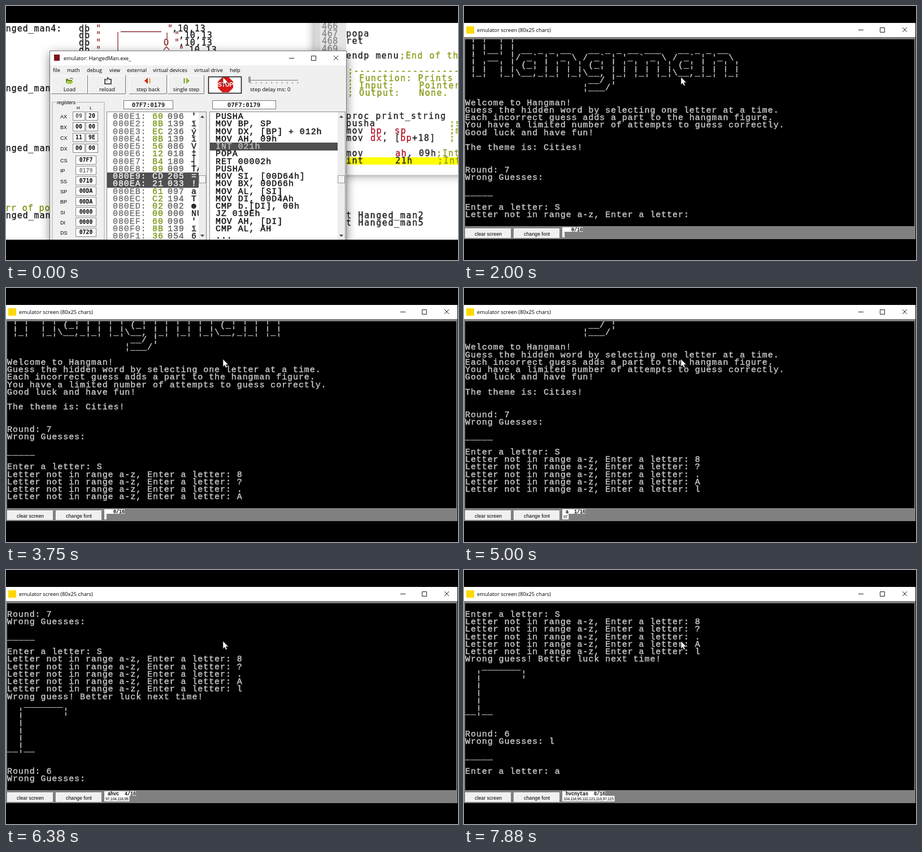
Write an HTML page that moves like this. It is 800 by 450 pixels and loops after 8 s.

```html
<!DOCTYPE html>
<html lang="en">
<head>
<meta charset="utf-8">
<title>Hangman in an emulator</title>
<style>
html, body { margin: 0; width: 100%; height: 100%; overflow: hidden; background: #000; }
svg { display: block; width: 800px; height: 450px; }
text { white-space: pre; }
.ui { font-family: "Open Sans", "Noto Sans", sans-serif; }
.btn { font-family: "Liberation Sans", Arial, sans-serif; }
.mono { font-family: "Liberation Mono", monospace; }
.code { font-family: "DejaVu Sans Mono", monospace; }
</style>
</head>
<body>
<svg id="stage" viewBox="0 0 800 450">
  <defs>
    <clipPath id="view"><rect y="30" width="800" height="384"/></clipPath>
    <clipPath id="tty"><rect x="2" y="59" width="795" height="331"/></clipPath>
    <clipPath id="mem"><rect x="179" y="188" width="162" height="226"/></clipPath>
    <filter id="shadow" x="-20%" y="-20%" width="140%" height="140%"><feGaussianBlur stdDeviation="9"/></filter>
  </defs>
  <rect width="800" height="450"/>
  <g id="desk" clip-path="url(#view)"></g>
  <g id="screen"></g>
  <path d="M384 126v13.5l3-2.8 2.1 4.6 2.3-1-2.1-4.5h4.2z" fill="#fff" stroke="#222" stroke-width=".7"/>
</svg>
<script>
const LOOP = 8000, CUT = 130, COL = 9.92, ROW = 13.25;
const desk = document.getElementById("desk");
const screen = document.getElementById("screen");

function add(parent, tag, attrs, str) {
  const el = document.createElementNS("http://www.w3.org/2000/svg", tag);
  for (const k in attrs) el.setAttribute(k, attrs[k]);
  if (str !== undefined) el.textContent = str;
  parent.appendChild(el);
  return el;
}
const box = (p, x, y, width, height, fill, more) => add(p, "rect", { x, y, width, height, fill, ...more });
const line = (p, d, stroke = "#222", more) => add(p, "path", { d, stroke, fill: "none", ...more });
const shape = (p, d, fill) => add(p, "path", { d, fill });
const text = (p, x, y, str, cls, size, fill = "#000", more) =>
  add(p, "text", { x, y, class: cls, "font-size": size, fill, ...more }, str);
// heavier strokes, as in the bitmap fonts
const grid = (p, x, y, str, fill) =>
  text(p, x, y, str, "mono", 15, fill, { "letter-spacing": COL - 9, stroke: fill, "stroke-width": .45 });
const code = (x, y, str, fill, spacing = .9) =>
  text(desk, x, y + 5, str, "code", 15, fill, { "letter-spacing": spacing, stroke: fill, "stroke-width": .35 });

function controls(p, x1, x2, x3, y) {
  line(p, `M${x1} ${y + .5}h9M${x2 + .5} ${y - 3.5}h8v8h-8zM${x3} ${y - 4}l8 8m0-8l-8 8`);
}
function button(p, x, y, w, h) {
  box(p, x, y, w, h, "#f0f0f0");
  line(p, `M${x + .5} ${y + h}v${.5 - h}h${w}`, "#fff");
  line(p, `M${x} ${y + h - .5}h${w - .5}v${-h}`, "#777");
}
function scrollbar(p, x) {
  box(p, x, 188, 13, 226, "#ececec");
  box(p, x + .5, 300.5, 12, 13, "#f4f4f4", { stroke: "#999" });
  shape(p, `M${x + 3} 198l3.5-4 3.5 4z`, "#444");
  shape(p, `M${x + 3} 405l3.5 4 3.5-4z`, "#444");
}

// ---- desktop with the debugger ----
function backdrop() {
  const K = "#1a1a1a", R = "#8c2a2a";
  box(desk, 0, 30, 800, 384, "#fff");
  code(-20, 40, "Hanged_man4:", K);
  for (const y of [146, 252, 371]) code(-20, y, "Hanged_man5", K);
  code(-11, 358, "arr of po", "#80900f");
  [[40, 286], [52, 298], [65, 298], [78, 306]].forEach(([y, x]) => {
    code(129, y, "db", K);
    code(159, y, '"', R);
    code(x, y, '"', R);
    code(x + 8, y, ",10,13", K);
  });
  line(desk, "M203 45.5h72M198 46v34M285 47v11M279 78l5-6 5 6", R, { "stroke-width": 1.3 });
  code(279, 65, "O", R);
  for (const [y, n] of [[371, 2], [384, 5]]) code(602, y, "t Hanged_man" + n, K, 1.6);
}

function editor() {
  box(desk, 546, 10, 270, 290, "#000", { filter: "url(#shadow)", opacity: .4 });
  box(desk, 546, 30, 254, 271, "#d8d8d8");
  box(desk, 556, 30, 244, 269, "#fff");
  box(desk, 556, 30, 46, 269, "#e6e6e6");
  box(desk, 546, 299, 254, 4, "#ccc");
  box(desk, 602, 268, 198, 13, "#ffff00");
  [466, 467, 468, 469].forEach((n, i) => code(559, 36 + i * 13.2, n, "#888", .6));
  const K = "#222", G = "#8a9a18", R = "#b41428";
  [
    [602, 49, "popa", K], [602, 62, "ret", K],
    [602, 88, "endp menu", K], [697, 88, ";End of the menu", G],
    [605, 115, ";" + "-".repeat(24), G],
    [605, 128, ";", G], [625, 128, "Function: Prints", G],
    [605, 141, ";", G], [625, 141, "Input:", G], [731, 141, "Pointer", G],
    [605, 154, ";", G], [625, 154, "Output:", G], [731, 154, "None.", G],
    [602, 195, "proc print_string", K],
    [602, 208, "pusha", K], [785, 208, ";s", G],
    [602, 221, "mov", K], [645, 221, "bp", R], [666, 221, ",", K], [688, 221, "sp", R], [785, 221, ";m", G],
    [602, 234, "mov", K], [645, 234, "dx", R], [666, 234, ",", K], [688, 234, "[", K], [698, 234, "bp", R],
    [719, 234, "+18]", K], [785, 234, "; I", G],
    [602, 261, "mov", K], [689, 261, "ah", R], [710, 261, ", 09h", K], [762, 261, ";Int", G],
    [602, 274, "int", K], [689, 274, "21h", K], [764, 274, ";Int", G],
  ].forEach(([x, y, s, c]) => code(x, y, s, c, 1.4));
}

function debuggerFrame() {
  box(desk, 78, 84, 525, 340, "#000", { filter: "url(#shadow)", opacity: .5 });
  box(desk, 77.5, 79.5, 525, 340, "#f0f0f0", { stroke: "#777" });
  box(desk, 78, 80, 524, 25, "#fff");
  box(desk, 85, 86, 10, 11, "#7d1418");
  text(desk, 102, 95.5, "emulator: HangedMan.exe_", "ui", 9.3);
  controls(desk, 501, 540, 580, 92);
  [[83, "file"], [108, "math"], [143, "debug"], [183, "view"], [214, "external"], [260, "virtual devices"],
    [333, "virtual drive"], [396, "help"]].forEach(([x, s]) => text(desk, x, 116.5, s, "ui", 9.2));

  [[80, 65, "Load"], [146, 66, "reload"], [218, 67, "step back"], [287, 64, "single step"]].forEach(([x, w, s]) => {
    button(desk, x, 123, w, 33);
    text(desk, x + w / 2, 150.5, s, "ui", 9.4, "#000", { "text-anchor": "middle" });
  });
  shape(desk, "M106 129h4l1 2h6v2h-8l-3 4z", "#6a8c20");
  shape(desk, "M107 138l3-5h9l-3 5z", "#a6c83c");
  line(desk, "M113 129q4-3 5 1", "#333");
  line(desk, "M177 130h-2v8h11v-8h-3M178 132l2-5 3 3", "#555", { "stroke-width": 2 });
  shape(desk, "M251 127v11l-6-5.5z", "#d42010");
  line(desk, "M254.5 128v9", "#e0a020", { "stroke-width": 2 });
  shape(desk, "M319 127v11l6-5.5z", "#86b82c");
  line(desk, "M315.5 128v9", "#809030", { "stroke-width": 2 });
  box(desk, 358.5, 125.5, 58, 29, "#fff", { stroke: "#111", "stroke-width": 1.5 });
  shape(desk, "M383 126h11l8 8v11l-8 8h-11l-8-8v-11z", "#d81818");
  text(desk, 388.5, 143, "STOP", "btn", 10, "#fff", { "text-anchor": "middle", "font-weight": 700 });
  line(desk, "M429 131.5h88", "#777");
  line(desk, "M433 136h85", "#777", { "stroke-width": 3, "stroke-dasharray": "1 8.2" });
  shape(desk, "M429 125h4v9l-2 3-2-3z", "#999");
  text(desk, 432, 150.5, "step delay ms: 0", "ui", 9.5);
}

function registers() {
  line(desk, "M88 170.5h-6v250M125 170.5h49v250", "#aaa");
  text(desk, 90, 173.5, "registers", "btn", 8.6);
  text(desk, 125, 183, "H", "btn", 8);
  text(desk, 148, 183, "L", "btn", 8);
  const cell = (x, y, w, s, c) => {
    box(desk, x + .5, y - 7.5, w, 15, "#fff", { stroke: "#888" });
    text(desk, x + w / 2 + .5, y + 3.3, s, "code", 9.8, c, { "text-anchor": "middle", "font-weight": 700 });
  };
  ["AX 09 20", "BX 00 00", "CX 11 9E", "DX 00 00"].forEach((row, i) => {
    const [name, hi, lo] = row.split(" "), y = 195 + i * 19;
    text(desk, 96, y + 4, name, "btn", 9);
    cell(118, y, 21, hi, i ? "#000" : "#555");
    cell(141, y, 21, lo);
  });
  ["CS 07F7", "IP 0179", "SS 0710", "SP 00DA", "BP 00DA", "SI 0000", "DI 0000", "DS 0720"].forEach((row, i) => {
    const [name, v] = row.split(" "), y = 273 + i * 18.3;
    text(desk, 96, y + 4, name, "btn", 9);
    cell(123, y, 36, v, name === "IP" ? "#777" : "#000");
  });
  for (const [x, w, tx] of [[208, 87, 252], [365, 112, 421]]) {
    box(desk, x + .5, 167.5, w, 15, "#fff", { stroke: "#777" });
    text(desk, tx, 178.5, "07F7:0179", "code", 10.8, "#222", { "text-anchor": "middle", "font-weight": 700 });
  }
}

function listings() {
  box(desk, 178.5, 187.5, 176, 235, "#fff", { stroke: "#888" });
  box(desk, 360.5, 187.5, 240, 235, "#fff", { stroke: "#888" });
  box(desk, 179, 295, 162, 27, "#505050");
  box(desk, 361, 242, 226, 14, "#505050");
  const mem = add(desk, "g", { "clip-path": "url(#mem)" });
  const bytes = [0x60, 0x8B, 0xEC, 0x8B, 0x56, 0x12, 0xB4, 9, 0xCD, 0x21, 0x61, 0xC2, 2, 0, 0x60, 0x8B, 0x36];
  const glyphs = "' ï ý ï V ‡ ┤ TA = ! a T ☻ NU ' ï 6".split(" ");
  const hex = n => n.toString(16).toUpperCase();
  bytes.forEach((b, i) => {
    const y = 200 + i * ROW, on = i === 8 || i === 9;
    const put = (x, s, c) => grid(mem, x, y, s, on ? "#eee" : c);
    put(189, "0" + hex(0x80E1 + i) + ":", "#777");
    put(259, hex(b).padStart(2, 0), "#7c9a1c");
    put(286, String(b).padStart(3, 0), "#666");
    put(328, glyphs[i], "#222");
  });
  ["PUSHA", "MOV BP, SP", "MOV DX, [BP] + 012h", "MOV AH, 09h", "INT 021h", "POPA", "RET 00002h", "PUSHA",
    "MOV SI, [00D64h]", "MOV BX, 00D66h", "MOV AL, [SI]", "MOV DI, 00D4Ah", "CMP b.[DI], 00h", "JZ 019Eh",
    "MOV AH, [DI]", "CMP AL, AH", "..."].forEach((s, i) =>
    grid(desk, 371, 200 + i * ROW, s, i === 4 ? "#bbb" : "#111"));
  scrollbar(desk, 341);
  scrollbar(desk, 587);
}

backdrop();
editor();
debuggerFrame();
registers();
listings();

// ---- emulator screen ----
box(screen, 0, 30, 800, 384, "#000");
box(screen, 0, 30, 799, 383, "#808080");
box(screen, 0, 30, 799, 25, "#fff");
box(screen, 2, 59, 795, 331, "#000");
box(screen, 4, 36, 14, 13, "#ffd800");
text(screen, 23, 46, "emulator screen (80x25 chars)", "ui", 9.3);
controls(screen, 698, 736, 776, 42);
for (const [x, s] of [[2, "clear screen"], [88, "change font"]]) {
  button(screen, x, 394, 82, 18);
  text(screen, x + 41, 406.5, s, "btn", 8.8, "#000", { "text-anchor": "middle" });
}
const keyBox = box(screen, 174, 392, 35, 8, "#fff");
const codeBox = box(screen, 174, 400, 4, 10, "#fff");
const keyText = text(screen, 175, 398.5, "", "mono", 8.33, "#000", { stroke: "#000", "stroke-width": .3 });
const codeText = text(screen, 176, 407.5, "", "btn", 7, "#000", { "letter-spacing": -.3 });
const tty = add(screen, "g", { "clip-path": "url(#tty)" });
const rows = Array.from({ length: 25 }, (_, i) => grid(tty, 2, 69.6 + i * ROW, "", "#c6c6c6"));

const banner = [
  "  _    _",
  " | |  | |",
  " | |__| | __ _ _ __   __ _ _ __ ___   __ _ _ __",
  " |  __  |/ _` | '_ \\ / _` | '_ ` _ \\ / _` | '_ \\",
  " | |  | | (_| | | | | (_| | | | | | | (_| | | | |",
  " |_|  |_|\\__,_|_| |_|\\__, |_| |_| |_|\\__,_|_| |_|",
  "                      __/ |",
  "                     |___/",
  "", ""].join("\n");
const gallows = "   _______\n  |       |\n" + "  |\n".repeat(4) + "__|__\n";
const retry = "Letter not in range a-z, Enter a letter: ";

// time, printed text
const output = [
  [130, banner],
  [250, "Welcome to Hangman!\nGuess the hidden word by selecting one letter at a time.\n"],
  [380, "Each incorrect guess adds a part to the hangman figure.\n"],
  [500, "You have a limited number of attempts to guess correctly.\n"],
  [630, "Good luck and have fun!\n\n"],
  [750, "The theme is: Cities!"],
  [1000, "\n\n\nRound: 7\n"],
  [1130, "Wrong Guesses: "],
  [1250, "\n\n_____\n\n"],
  [1380, "Enter a letter: "],
  [1750, "S\n"], [1880, retry], [2500, "8\n"],
  [2750, retry], [2880, "?\n"], [3130, retry], [3250, ".\n"], [3500, retry], [3630, "A"],
  [3880, "\n"], [4000, retry], [4500, "l\n"],
  [5130, "Wrong guess! Better luck next time!\n"],
  [5500, gallows],
  [6000, "\n\nRound: 6\n"],
  [6250, "Wrong Guesses: "],
  [6500, "l\n"], [6750, "\n_____\n"], [7130, "\nEnter a letter: "], [7630, "a\n"],
];
// time, waiting keys
const queue = [
  [0, ""], [2250, "?"], [2500, "?."], [2880, "."], [3130, ".A"], [3250, "A"], [3630, ""],
  [4750, "a"], [5250, "ah"], [5630, "ahv"], [6130, "ahvc"], [6500, "ahvcn"], [6750, "ahvcny"],
  [7000, "ahvcnyt"], [7250, "ahvcnyta"], [7500, "ahvcnytas"], [7630, "hvcnytas"],
];

function draw(t) {
  const live = t >= CUT;
  desk.style.display = live ? "none" : "";
  screen.style.display = live ? "" : "none";
  if (!live) return;

  const lines = output.filter(s => s[0] <= t).map(s => s[1]).join("").replaceAll("|", "¦").split("\n");
  const top = Math.max(0, lines.length - 24);
  rows.forEach((el, i) => { el.textContent = lines[top + i] || ""; });

  const keys = queue.filter(s => s[0] <= t).pop()[1];
  const label = ` ${keys}  ${keys.length}/16`;
  keyText.textContent = label;
  keyBox.setAttribute("width", label.length * 5 + 1);
  codeText.textContent = [...keys].map(c => c.charCodeAt(0)).join();
  codeBox.setAttribute("width", keys ? codeText.getComputedTextLength() + 4 : 4);
}

const start = performance.now();
function tick() {
  draw((performance.now() - start) % LOOP);
  requestAnimationFrame(tick);
}
tick();
</script>
</body>
</html>
```
